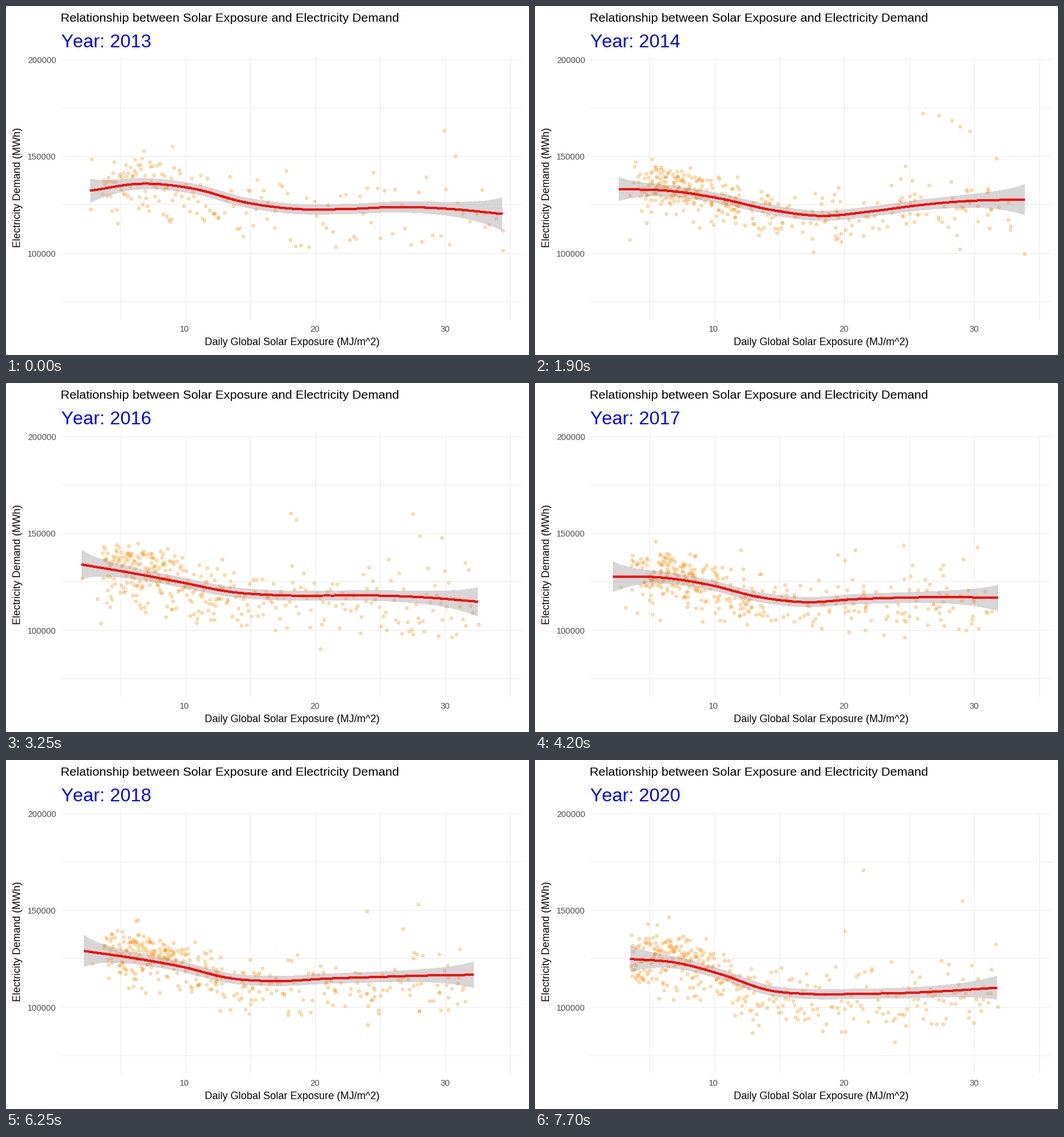
Write a matplotlib script that moves like this. It is 900 by 600 pixels and loops after 8000 ms.

```python
import numpy as np
import matplotlib.pyplot as plt
from matplotlib.animation import FuncAnimation

W, H, DPI = 900, 600, 100
PT = 72 / DPI  # points per pixel
plt.rcParams["font.family"] = ["Liberation Sans", "DejaVu Sans"]

# share of days below each x position
SHARE = [0, .12, .27, .42, .6, .72, .86, 1]
SPREAD = [165, 203, 243, 288, 375, 470, 630]


def hermite(x, kx, ky):
    slope = np.gradient(ky, kx)
    i = np.clip(np.searchsorted(kx, x) - 1, 0, len(kx) - 2)
    h = kx[i + 1] - kx[i]
    u = (x - kx[i]) / h
    return ((1 + 2 * u) * (1 - u) ** 2 * ky[i] + u * (1 - u) ** 2 * h * slope[i]
            + u * u * (3 - 2 * u) * ky[i + 1] + u * u * (u - 1) * h * slope[i + 1])


def smooth(x0, x1, left, right, heights):
    """80 rows of x, trend and half width; heights are evenly spaced in x."""
    x = np.linspace(x0, x1, 80)
    y = hermite(x, np.linspace(x0, x1, len(heights)), np.array(heights, float))
    base = 8.2
    w = (base + (left - base) * np.exp((x0 - x) / 35)
         + (right - base) * np.exp((x - x1) / 52))
    return np.column_stack([x, y, w])


def cloud(year, count, curve, far):
    """Daily points in date order: the far ones plus noise around the trend."""
    rng = np.random.default_rng(year)
    n = count - len(far)
    x = np.interp((np.arange(n) + rng.random(n)) / n, SHARE, SPREAD + [curve[-1, 0] - 8])
    trend = np.interp(x, curve[:, 0], curve[:, 1])
    weekday = (x < 310) & (rng.random(n) < .45)
    wide = np.where(x < 480, 27, 33)
    noise = np.where(weekday, rng.normal(-25, 12, n), rng.normal(10, wide, n))
    y = trend + np.clip(noise, -82, 64)
    pts = np.vstack([far, np.column_stack([x, y])])
    season = np.argsort(pts[:, 0] + rng.normal(0, 70, count))
    if count < 300:  # second half of a year: winter to summer
        return pts[season]
    season = season[::-1]  # summer, winter, summer
    return pts[np.concatenate([season[::2], season[1::2][::-1]])]


curves, clouds = [], []


def add_year(year, count, span, heights, far):
    curves.append(smooth(*span, heights))
    clouds.append(cloud(year, count, curves[-1], far))


add_year(2013, 183, (145, 854, 20, 28),
         [317.5, 305.5, 314, 337.5, 349, 349, 345.5, 349, 357.5],
         [(146, 262), (145, 348), (285, 240), (481, 282), (753, 213),
          (772, 257), (854, 385), (854, 419), (823, 379), (631, 285)])
add_year(2014, 365, (140, 847, 21, 28),
         [315, 316, 328.5, 348.5, 357.5, 348, 335.5, 331, 334.5],
         [(140, 319), (151, 413), (665, 111), (712, 108), (722, 131),
          (765, 152), (752, 176), (664, 212), (847, 426), (751, 448)])
add_year(2015, 365, (155, 832, 17.5, 20.5),
         [314, 322.5, 337.5, 355.5, 369, 365, 357, 344, 329],
         [(155, 341), (199, 255), (501, 440), (738, 230), (816, 249),
          (610, 241), (628, 246), (668, 246), (832, 385), (827, 424)])
add_year(2016, 366, (130, 812, 24.5, 24.5),
         [312, 326.5, 342.5, 359, 365, 365.5, 365.5, 369, 376],
         [(130, 335), (156, 370), (162, 412), (489, 223), (498, 234),
          (699, 224), (711, 262), (749, 265), (812, 414), (540, 456)])
add_year(2017, 365, (138, 787, 26.5, 20),
         [346.5, 340.5, 351, 374, 385, 376.5, 372, 367.5, 365],
         [(145, 388), (180, 426), (190, 256), (598, 248), (607, 243),
          (712, 258), (768, 270), (785, 429), (725, 470), (292, 458)])
add_year(2018, 365, (135, 805, 26, 22),
         [330, 341, 355, 375, 380, 376, 373, 370, 368],
         [(135, 345), (805, 420), (705, 230), (610, 245), (640, 461)])
add_year(2019, 365, (132, 799, 31.5, 21.5),
         [315.5, 336, 358, 377, 380, 374.5, 374, 375.5, 379.5],
         [(132, 330), (152, 364), (189, 405), (557, 212), (580, 249),
          (616, 194), (736, 238), (765, 255), (775, 457), (799, 427)])
add_year(2020, 366, (164, 795, 22.5, 20),
         [342, 348.5, 369, 395.5, 402.5, 402, 400.5, 396.7, 391.5],
         [(164, 353), (178, 317), (193, 281), (373, 468), (532, 293),
          (564, 188), (734, 241), (792, 316), (795, 423), (618, 484)])

# The 2017 values were read one step into the move, so step back.
for data in (curves, clouds):
    data[4] = (data[4] - data[5] / 9) / (1 - 1 / 9)


fig = plt.figure(figsize=(W / DPI, H / DPI), dpi=DPI, facecolor="white")
ax = fig.add_axes([0, 0, 1, 1])
ax.set(xlim=(0, W), ylim=(H, 0))
ax.axis("off")


def label(x, y, text, px, color="black", **kw):
    return ax.text(x, y, text, fontsize=px * PT, color=color,
                   va="baseline", rotation_mode="anchor", **kw)


grid = dict(color="#EBEBEB", lw=PT, zorder=1, solid_capstyle="butt")
for i in range(7):
    x = round(195.6 + 111.9 * i) + .5
    ax.plot([x, x], [88, 539], **grid)
for i in range(6):
    y = int(91.2 + 83.25 * i) + .5
    ax.plot([94, 890], [y, y], **grid)

for i in range(3):
    label(86.5, 98 + 166.5 * i, str(200000 - 50000 * i), 14.6, "#4D4D4D", ha="right")
    label(307.5 + 224 * i, 560, str(10 * (i + 1)), 14.6, "#4D4D4D", ha="center")
label(492.5, 583, "Daily Global Solar Exposure (MJ/m^2)", 17.8, ha="center")
label(25, 312, "Electricity Demand (MWh)", 17.8, ha="center", rotation=90)
label(94, 27, "Relationship between Solar Exposure and Electricity Demand", 21.4)
label(94, 71, "Y", 32, "blue")  # set apart to avoid kerning
year_text = label(115, 71, "", 32, "blue")

orange = (1, 140 / 255, 0, .3)
dots = ax.scatter([], [], s=(5.4 * PT) ** 2, facecolors=[orange],
                  edgecolors=[orange], linewidths=PT, zorder=2)
band, = ax.fill([0, 1, 1], [0, 0, 1], color="#999999", alpha=.4, lw=0,
                zorder=3, antialiased=False)
trend, = ax.plot([], [], color="red", lw=3 * PT, zorder=4,
                 solid_capstyle="butt", antialiased=False)

# (first frame, number of steps) of each move to the next year
MOVES = [(15, 7), (37, 7), (59, 7), (81, 7), (103, 9), (125, 9), (146, 9)]


def state(frame):
    """Index of the current year and progress to the next one."""
    for i, (start, steps) in enumerate(MOVES):
        if frame < start:
            return i, 0
        if frame < start + steps - 1:
            return i, (frame - start + 1) / steps
    return len(MOVES), 0


def draw(frame):
    i, t = state(frame)
    pts, curve = clouds[i], curves[i]
    if t:
        n = min(len(pts), len(clouds[i + 1]))
        pts = (1 - t) * pts[:n] + t * clouds[i + 1][:n]
        curve = (1 - t) * curve + t * curves[i + 1]
    x, y, w = curve.T
    dots.set_offsets(pts + .5)
    band.set_xy(np.column_stack([np.r_[x, x[::-1]], np.r_[y - w, (y + w)[::-1]]]))
    trend.set_data(x, y)
    year_text.set_text(f"ear: {2013 + i + (t >= .5)}")
    return dots, band, trend, year_text


anim = FuncAnimation(fig, draw, frames=160, interval=50, repeat=True,
                     repeat_delay=0, blit=False)
plt.show()
```
